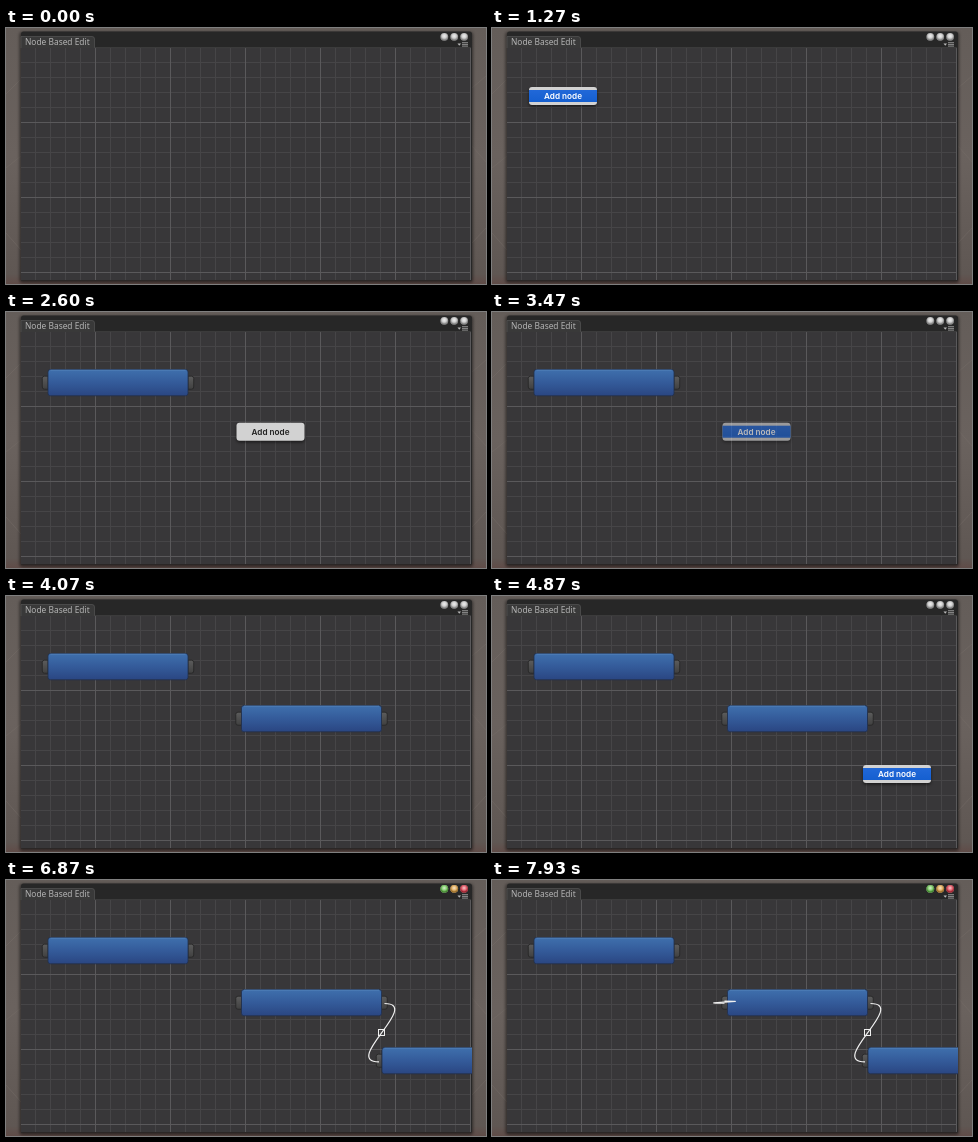
Recreate the animation shown at these times as an HTML page. Size 480 by 256 pixels, loop 8 s.

```html
<!DOCTYPE html>
<html lang="en">
<head>
<meta charset="utf-8">
<title>Node editor</title>
<style>
html, body { margin: 0; width: 100%; height: 100%; overflow: hidden; background: #5f5854; }
svg { display: block; width: 100vw; height: 100vh; }
.tab { font: 8.4px "Noto Sans", "Open Sans", sans-serif; fill: #b4b4b4; }
.item { font: 600 8.2px Inter, Roboto, sans-serif; text-anchor: middle; }
.anim { animation: 8s step-end infinite; opacity: 0; }

/* Menus pop in, then fade out once the item is chosen */
#menu1 { animation-name: menu1; }
#menu2 { animation-name: menu2; }
#menu3 { animation-name: menu3; }
@keyframes menu1 {
  12.5% { opacity: 1; }
  24.25% { opacity: 1; animation-timing-function: linear; }
  26.75%, 100% { opacity: 0; }
}
@keyframes menu2 {
  32.5% { opacity: 1; }
  42.5% { opacity: 1; animation-timing-function: linear; }
  45%, 100% { opacity: 0; }
}
@keyframes menu3 {
  53.375% { opacity: 1; }
  62.5% { opacity: 1; animation-timing-function: linear; }
  65%, 100% { opacity: 0; }
}

#hover1 { animation-name: hover1; }
#hover2 { animation-name: hover2; }
#hover3 { animation-name: hover3; }
@keyframes hover1 { 15.875%, 100% { opacity: 1; } }
@keyframes hover2 { 35.875%, 100% { opacity: 1; } }
@keyframes hover3 { 55.875%, 100% { opacity: 1; } }

#node1 { animation-name: node1; }
#node2 { animation-name: node2; }
#node3 { animation-name: node3; }
@keyframes node1 { 26.75%, 100% { opacity: 1; } }
@keyframes node2 { 45%, 100% { opacity: 1; } }
@keyframes node3 { 65%, 100% { opacity: 1; } }

#focus { animation-name: focus; }
#press { animation-name: press; }
#link { animation-name: link; }
#loose { animation-name: loose; }
@keyframes focus { 71.6%, 100% { opacity: 1; } }
@keyframes press { 70.8% { opacity: 1; } 74.1%, 100% { opacity: 0; } }
@keyframes link { 83.3%, 100% { opacity: 1; } }
@keyframes loose { 97.4%, 100% { opacity: 1; } }

/* The loose end of the wire follows the pointer */
#drag { animation-name: drag, pull; }
@keyframes drag { 74.1% { opacity: 1; } 83.3%, 100% { opacity: 0; } }
@keyframes pull {
  0%, 74.1% {
    d: path("M373 181.8C335.5 181.8 411 180 373.5 180");
    animation-timing-function: ease-in-out;
  }
  82%, 100% { d: path("M373 181.8C335.5 181.8 416 123.5 378.5 123.5"); }
}
</style>
</head>
<body>
<svg viewBox="0 0 480 256" preserveAspectRatio="none">
  <defs>
    <linearGradient id="desk" x2="0" y2="1">
      <stop stop-color="#645d59"/><stop offset=".5" stop-color="#6a625e"/>
      <stop offset=".96" stop-color="#5f5753"/><stop offset="1" stop-color="#604c48"/>
    </linearGradient>
    <linearGradient id="blue" x2="0" y2="1">
      <stop stop-color="#3f70ad"/><stop offset=".5" stop-color="#345b9a"/><stop offset="1" stop-color="#2a4682"/>
    </linearGradient>
    <linearGradient id="grey" x2="0" y2="1">
      <stop stop-color="#5c5c5c"/><stop offset="1" stop-color="#404040"/>
    </linearGradient>
    <linearGradient id="pick" x2="0" y2="1">
      <stop stop-color="#2168d8"/><stop offset="1" stop-color="#155fd0"/>
    </linearGradient>
    <radialGradient id="shine" cy=".4">
      <stop stop-color="#fff" stop-opacity=".75"/><stop offset=".55" stop-color="#fff" stop-opacity=".3"/>
      <stop offset="1" stop-color="#000" stop-opacity=".3"/>
    </radialGradient>
    <filter id="soft" x="-20%" y="-50%" width="140%" height="200%"><feGaussianBlur stdDeviation="1.6"/></filter>
    <pattern id="minor" x="14" y="19" width="15" height="15" patternUnits="userSpaceOnUse">
      <path d="M.5 0V15M0 .5H15" stroke="#464547"/>
    </pattern>
    <pattern id="major" x="14" y="19" width="75" height="75" patternUnits="userSpaceOnUse">
      <path d="M.5 0V75M0 .5H75" stroke="#5a595b"/>
    </pattern>
    <clipPath id="view"><rect x="15" y="20" width="450.5" height="232"/></clipPath>

    <path id="socket" d="M0 .5H-3.5Q-5.7 .5 -5.7 2.7V11.3Q-5.7 13.5 -3.5 13.5H0Z" stroke="#252525" stroke-width=".8"/>
    <g id="node">
      <use href="#socket" y="6.7" fill="url(#grey)"/>
      <use href="#socket" transform="translate(140 6.7) scale(-1 1)" fill="url(#grey)"/>
      <rect y=".4" width="140" height="26.4" rx="2.6" fill="url(#blue)" stroke="#22304c" stroke-width=".8"/>
      <path d="M2.5 1.1H137.5" stroke="#5a8abf" stroke-width=".7"/>
    </g>
    <g id="menu">
      <rect y="1.5" width="68" height="18" rx="3" fill="#000" opacity=".55" filter="url(#soft)"/>
      <rect width="68" height="18" rx="3" fill="#d2d2d2"/>
      <text class="item" x="34" y="12.1" fill="#222">Add node</text>
    </g>
    <g id="hover">
      <rect y="3" width="68" height="12" fill="url(#pick)"/>
      <text class="item" x="34" y="12.1" fill="#fff">Add node</text>
    </g>
  </defs>

  <rect width="480" height="256" fill="url(#desk)"/>
  <path d="M0 66L14 52M0 140L15 128M0 205L15 222M466 60L480 48M466 118L480 134M466 215L480 200" stroke="#766e69" stroke-width=".8" opacity=".6"/>
  <rect x="13.5" y="4" width="453.5" height="251" rx="3" fill="#000" opacity=".5" filter="url(#soft)"/>
  <path d="M15 252.5V6Q15 3.5 17.5 3.5H463.5Q466 3.5 466 6V252.5Z" fill="#272727"/>

  <rect x="15" y="20" width="450" height="232" fill="#383739"/>
  <rect x="15" y="20" width="450" height="232" fill="url(#minor)"/>
  <rect x="15" y="20" width="450" height="232" fill="url(#major)"/>

  <path d="M15 20V8.5H86Q88.5 8.5 88.5 11V20" fill="#393939" stroke="#555" stroke-width=".7"/>
  <path d="M88.5 19.6H465" stroke="#444" stroke-width=".8"/>
  <text class="tab" x="19" y="17.2">Node Based Edit</text>
  <path d="M451.5 15.5H455L453.25 17.8Z" fill="#bbb"/>
  <path d="M456 14.7H462M456 16.4H462M456 18.1H462" stroke="#aaa" stroke-width=".8"/>

  <g fill="#bdbdbd">
    <circle cx="438.3" cy="8.8" r="3.9"/><circle cx="448.2" cy="8.8" r="3.9"/><circle cx="458.1" cy="8.8" r="3.9"/>
  </g>
  <g id="focus" class="anim">
    <circle cx="438.3" cy="8.8" r="3.9" fill="#5fc043"/>
    <circle cx="448.2" cy="8.8" r="3.9" fill="#dc9a35"/>
    <circle cx="458.1" cy="8.8" r="3.9" fill="#dd3040"/>
  </g>
  <g fill="url(#shine)">
    <circle cx="438.3" cy="8.8" r="3.9"/><circle cx="448.2" cy="8.8" r="3.9"/><circle cx="458.1" cy="8.8" r="3.9"/>
  </g>

  <g clip-path="url(#view)">
    <g id="node1" class="anim"><use href="#node" x="42" y="57"/></g>
    <g id="node2" class="anim"><use href="#node" x="235.5" y="109"/></g>
    <g id="node3" class="anim"><use href="#node" x="376" y="167"/></g>
    <use id="press" class="anim" href="#socket" x="376" y="173.7" fill="#858585"/>
    <g fill="none" stroke="#f0f0f0" stroke-width="1.2">
      <path id="drag" class="anim" d="M373 181.8C335.5 181.8 411 180 373.5 180"/>
      <g id="link" class="anim">
        <path d="M373 181.8C335.5 181.8 416 123.5 378.5 123.5"/>
        <rect x="372.5" y="149.5" width="6" height="6" stroke-width="1"/>
      </g>
      <path id="loose" class="anim" d="M232.5 123.2C195 123.2 270 121.2 232.5 121.2"/>
    </g>
  </g>

  <g id="menu1" class="anim">
    <use href="#menu" x="37" y="59"/>
    <g id="hover1" class="anim"><use href="#hover" x="37" y="59"/></g>
  </g>
  <g id="menu2" class="anim">
    <use href="#menu" x="230.5" y="110.7"/>
    <g id="hover2" class="anim"><use href="#hover" x="230.5" y="110.7"/></g>
  </g>
  <g id="menu3" class="anim">
    <use href="#menu" x="371" y="169"/>
    <g id="hover3" class="anim"><use href="#hover" x="371" y="169"/></g>
  </g>
</svg>
</body>
</html>
```
